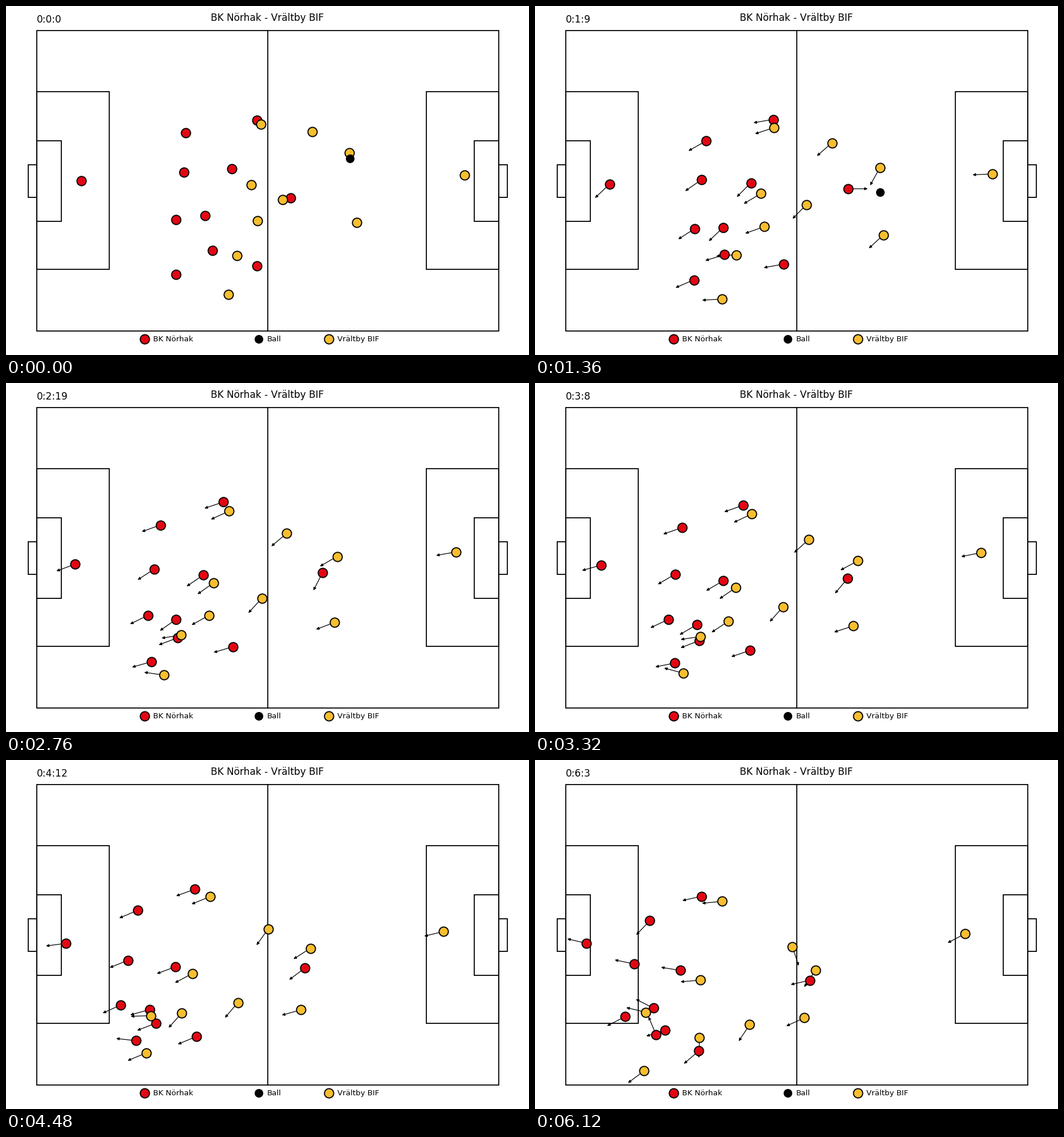
A matplotlib script for the animation above (6.16 s loop, 917x611 px).

```python
import numpy as np
import matplotlib.pyplot as plt
from matplotlib.animation import FuncAnimation
from matplotlib.patches import FancyArrowPatch, Rectangle

W, H, DPI = 917, 611, 100
FPS, FRAMES = 25, 154
PX = 72 / DPI
RED, GOLD = "#e30613", "#f7be2f"
HOME, AWAY = "BK Nörhak", "Vrältby BIF"
KEYS = (0, 1.36, 3.84, 6.12)  # seconds at which each run passes its points
ARROW = 35
BALL_OUT = 2.0

plt.rcParams["font.family"] = "DejaVu Sans"


class Player:
    """A run along the polynomial through a few points."""

    def __init__(self, *points, times=KEYS, since=0.0, until=99.0):
        n = len(points) - 1
        self.path = np.polyfit(times, np.array(points, float) - 0.5, n)
        self.speed = self.path[:-1] * np.arange(n, 0, -1)[:, None]
        self.since, self.until = since, until

    def visible(self, t):
        return self.since <= t <= self.until

    def at(self, t):
        """Position and arrow tip; the arrow shows direction only."""
        pos, vel = np.polyval(self.path, t), np.polyval(self.speed, t)
        return pos, pos + ARROW * vel / max(np.hypot(*vel), 1e-6)


home = [
    Player((132, 307), (131, 312.5), (111.5, 320.5), (91, 321.5)),
    Player((315, 222.5), (300, 237), (246, 258), (202, 281.5)),
    Player((312, 292), (292.5, 304.5), (232, 343), (174.5, 357.5)),
    Player((299, 374.5), (281, 390), (220, 421), (158, 450)),
    Player((299, 470.5), (279, 480), (237.5, 492), (213, 482)),
    Player((440.5, 200), (418, 199), (350, 220), (293, 239)),
    Player((397, 285.5), (379, 310), (316, 354.5), (256, 369)),
    Player((350, 367), (330.5, 388), (270, 431), (208.5, 435)),
    Player((362.5, 428.5), (332.5, 436), (277, 456), (229, 473.5)),
    Player((440, 455), (436, 452.5), (358, 475.5), (288, 509.5)),
    Player((499, 337), (549, 320.5), (539.5, 352), (483, 386)),
]

away = [
    Player((804.5, 296), (802.5, 294.5), (775.5, 299), (755, 304.5)),
    Player((538, 221), (521, 240), (470.5, 284), (452, 327.5)),
    Player((602, 258), (605, 284), (552.5, 319.5), (492, 369)),
    Player((615.5, 379), (611.5, 401), (540, 431.5), (473, 452)),
    Player((447, 208), (419.5, 213.5), (370.5, 234.5), (328, 248)),
    Player((430.5, 313.5), (396.5, 329), (341.5, 366), (290.5, 386)),
    Player((485.5, 340), (476.5, 348), (422.5, 407), (377, 463.5)),
    Player((441, 376.5), (402, 387), (324.5, 428.5), (289, 487)),
    Player((405, 437.5), (353, 436), (274.5, 446.5), (194.5, 442)),
    # The left winger leaves the picture as another one takes over.
    Player((391, 505.5), (328.5, 513.5), (247, 504), times=KEYS[:3], until=4.1),
    Player((267.5, 506), (246, 513.5), (191.5, 545), times=(3.84, 4.48, 6.12), since=3.4),
]

fig = plt.figure(figsize=(W / DPI, H / DPI), dpi=DPI, facecolor="white")
ax = fig.add_axes([0, 0, 1, 1])
ax.set(xlim=(0, W), ylim=(H, 0))
ax.axis("off")


def box(x0, y0, x1, y1):
    ax.add_patch(Rectangle((x0, y0), x1 - x0, y1 - y0, fill=False,
                           lw=1.8 * PX, ec="black", zorder=1))


def dots(color, size, z, x=(), y=()):
    return ax.plot(x, y, "o", color=color, mec="black", ms=size * PX,
                   mew=1.9 * PX, zorder=z, snap=False)[0]


def label(x, y, text, size, **kw):
    return ax.text(x, y, text, fontsize=size * PX, va="baseline", **kw)


def arrow():
    style = "-|>,head_length=.3,head_width=.14"
    return ax.add_patch(FancyArrowPatch((0, 0), (1, 1), arrowstyle=style, mutation_scale=10,
                                        shrinkA=0, shrinkB=0, lw=1.25 * PX,
                                        color="black", zorder=3))


box(54, 43, 864, 568.5)
ax.plot([459, 459], [43, 568.5], color="black", lw=1.8 * PX, zorder=1)
for depth, top, bottom in [(127, 150, 461), (43, 235.5, 376.5), (-15.3, 277.5, 334.5)]:
    box(54, top, 54 + depth, bottom)
    box(864 - depth, top, 864, bottom)

label(458.5, 25.5, f"{HOME} - {AWAY}", 17, ha="center")
clock = label(54, 29, "", 17)
for x, name, color, size in [(242.5, HOME, RED, 16.2), (442.8, "Ball", "black", 13.2),
                             (566, AWAY, GOLD, 16.2)]:
    dots(color, size, 4, [x], [583])
    label(x + 15, 587, name, 13.4)

teams = [(home, dots(RED, 16.2, 4)), (away, dots(GOLD, 16.2, 5))]
ball = dots("black", 13.2, 6)
arrows = {p: arrow() for p in home + away}


def update(i):
    t = i / FPS
    clock.set_text(f"0:{i // FPS}:{i % FPS}")
    for team, marks in teams:
        spots = []
        for p in team:
            shown = p.visible(t)
            arrows[p].set_visible(shown and i > 0)
            if shown:
                pos, tip = p.at(t)
                spots.append(pos)
                arrows[p].set_positions(tuple(pos), tuple(tip))
        marks.set_data(*np.array(spots).T)
    ball.set_data([602.5 + 1.5 * t], [266.5 + 44 * t])
    ball.set_visible(t < BALL_OUT)
    return []


anim = FuncAnimation(fig, update, frames=FRAMES, interval=1000 / FPS, repeat=True)
plt.show()
```
